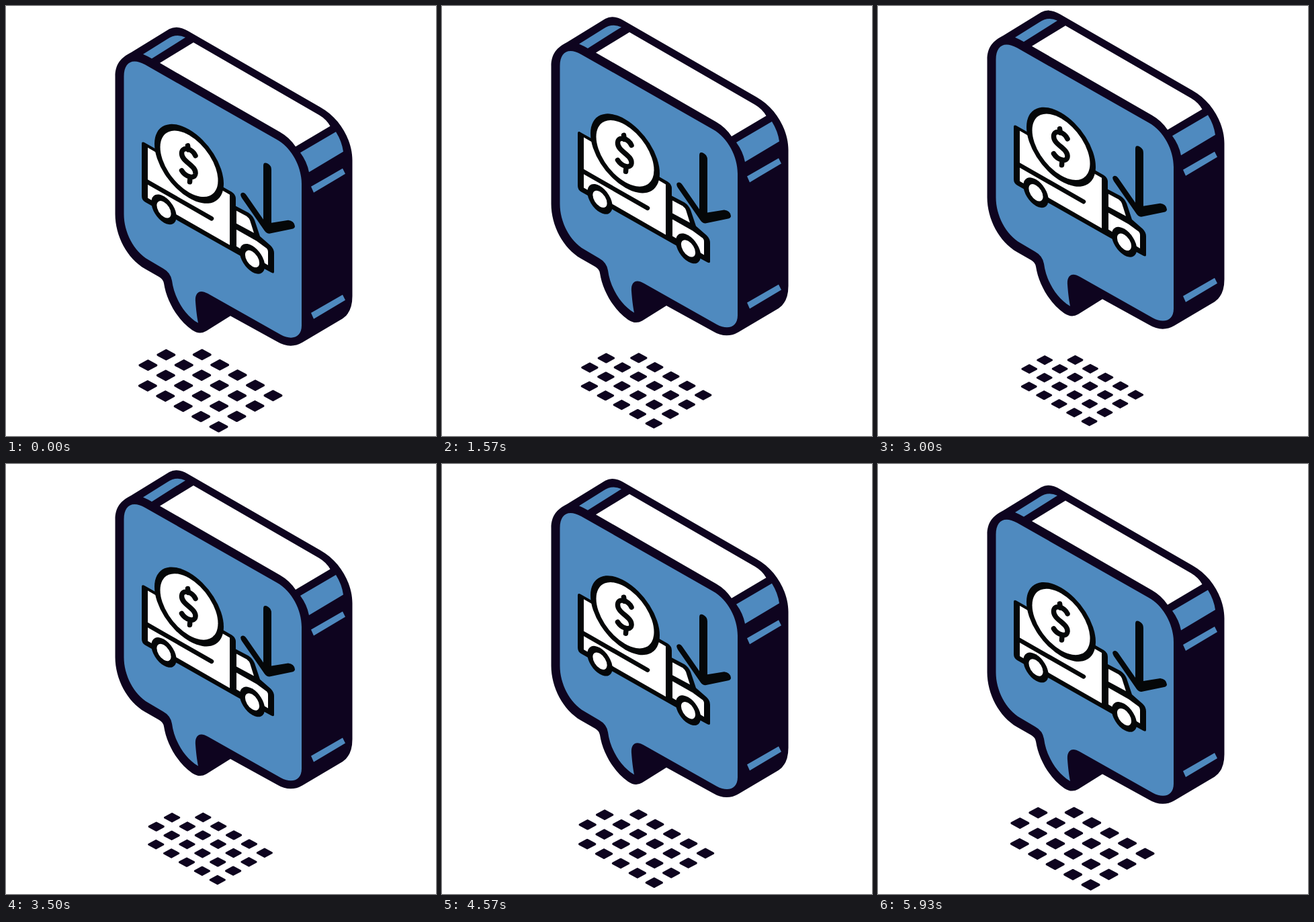
These frames come from a looping animation (640x640 px, 6 s). An HTML page:

```html
<!DOCTYPE html>
<html lang="en">
<head>
<meta charset="utf-8">
<title>Floating delivery badge</title>
<style>
  html, body { margin: 0; width: 100%; height: 100%; overflow: hidden; background: #fff; }
  svg { display: block; width: 100vw; height: 100vh; }
  .dark { fill: #0e041f; }
  .blue { fill: #4f8abf; }
  .white { fill: #fff; }
  .black { fill: #050708; }
  .line { fill: none; stroke: #050708; stroke-linecap: round; stroke-linejoin: round; }
  #shadow { fill: #0e041f; stroke: #0e041f; stroke-width: 3.4; stroke-linejoin: round; }
</style>
</head>
<body>
<svg viewBox="0 0 640 640">
  <defs>
    <path id="dot" d="M-12.3 0L0 -6.6L12.3 0L0 6.6Z"/>
    <g id="wheel" transform="matrix(1 .577 0 1.05 0 0)">
      <circle class="black" r="18.7"/>
      <circle class="white" r="10.6"/>
    </g>
  </defs>

  <g id="shadow"></g>

  <g id="badge">
    <path class="dark" d="M162.5 105C162.5 87 171 77 186 69.5L243 34.5Q255 28 271 37.5L468 151C497 167 515.5 200 515.5 230V432Q515.5 456 501 465.5L441 501Q423 511.5 403 499.5L334 461.5L298 484Q288 490 277 482.5C255 467 239 439 235 413Q234 407 228 403.5L207 391.5C180 376 162.5 342 162.5 310Z"/>
    <path class="blue" d="M175.5 105C175.5 84 188 77 207 87.5L403 199C426 212 440 240 440 265V476C440 493 426 498.500 409 489.500L300 428C288 421 281 427 282 440C283 453 284 461 286 472C265 460 250 433 247 409Q245 397 234 391L212 378C190 365 175.5 337 175.5 310Z"/>
    <path class="white" d="M229 85L279 54.5L466 162.500Q477 169 482.500 179L431 209.500Q422 196 408 188Z"/>
    <path class="blue" d="M204 72L240 49.5Q253 40.500 267 47L217 78.5Q211 75 204 72Z"/>
    <path class="blue" d="M438 218.5L491 187.5Q500 202 502 217L451 247.5Q448 232 438 218.5Z"/>
    <path class="blue" d="M454 269L501 242L505 250L458 278ZM454 457L501 430L505 438L458 466Z"/>

    <path class="black" d="M202 205Q202 201 207 204L336 277Q342 281 342 287V298L361 308Q367 312 370 319L378 343L394 357Q399 362 399 368V396Q399 399 395 397L345 370L207 292Q202 289 202 283Z"/>
    <path class="white" d="M211 211L333 281V356L211 286Z"/>
    <path class="white" d="M343 305L358 313Q362 316 363 319L369 338L343 324Z"/>
    <path class="white" d="M343 333L373 350L388 361Q390 363 390 366V386L343 358Z"/>
    <path class="line" stroke-width="6.5" d="M208 260.5L306 316.500"/>
    <use href="#wheel" transform="translate(235 303)"/>
    <use href="#wheel" transform="translate(366.5 376.5)"/>

    <g transform="matrix(1 .577 0 .99 272.5 235)">
      <circle class="black" r="51.5"/>
      <circle class="white" r="43"/>
    </g>
    <path class="line" stroke-width="7.5" d="M282 223C278 213 262 208 261.5 219C261 232 283 237 282 249.500C281 259 267 254 261.500 245M270.5 208L271.5 214M274 256L273.5 262"/>

    <path class="black" d="M383 238Q383 231 390 235Q395 238 395 244V323L420 319Q429 320 430 328Q430 331 426 332L392 339Q388 339 385 335L351 286Q348 281 350 279Q354 276 358 282L383 318Z"/>
  </g>
</svg>
<script>
const LOOP = 6000, LEAD = 150;
const badge = document.getElementById('badge');
const shadow = document.getElementById('shadow');

// 4 x 6 isometric grid without its left and top corners
for (let row = 0; row < 4; row++) {
  for (let col = 0; col < 6; col++) {
    if (col === 0 && row % 3 === 0) continue;
    const dot = document.createElementNS('http://www.w3.org/2000/svg', 'use');
    dot.setAttribute('href', '#dot');
    dot.setAttribute('x', 184.3 + 26.45 * col + 27 * row);
    dot.setAttribute('y', 550.1 + 15.25 * col - 15.5 * row);
    shadow.append(dot);
  }
}

function draw(now) {
  const lift = (1 - Math.cos((now + LEAD) / LOOP * 2 * Math.PI)) / 2;
  badge.setAttribute('transform', `translate(0 ${-25.4 * lift})`);
  shadow.setAttribute('transform',
    `translate(303.5 572) scale(${1 - 0.152 * lift}) translate(-303.5 -572)`);
  requestAnimationFrame(draw);
}
draw(performance.now());
</script>
</body>
</html>
```
